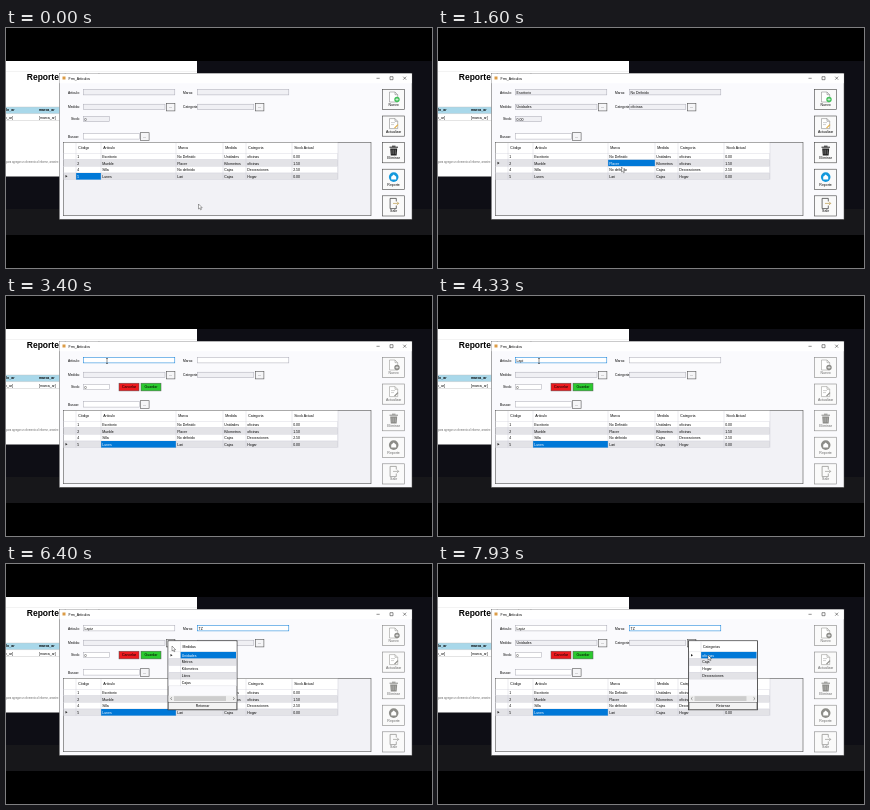
Recreate the animation shown at these times as an HTML page. Size 426 px wide and 240 px high, loop 8 s.

```html
<!DOCTYPE html>
<html lang="es">
<head>
<meta charset="utf-8">
<title>Artículos</title>
<style>
  html, body { margin: 0; width: 100%; height: 100%; overflow: hidden; background: #000; }
  svg { display: block; width: 100vw; height: 100vh; }
  text { font: 3.5px "Liberation Sans", Arial, sans-serif; fill: #000; white-space: pre; }
</style>
</head>
<body>
<svg viewBox="0 0 426 240" preserveAspectRatio="none">
  <g id="base"></g>
  <g id="live"></g>
  <g id="pointer"></g>
</svg>
<script>
const LOOP = 8000, STEP = 200 / 3;
const BLUE = '#0078d7', LINE = '#c9c9d3', READONLY = '#f0f0f4';
const byId = id => document.getElementById(id);

const box = (x, y, w, h, fill, stroke = 'none', sw = .6) =>
  `<rect x="${x}" y="${y}" width="${w}" height="${h}" fill="${fill}" stroke="${stroke}" stroke-width="${sw}"/>`;
const label = (x, y, s, style = '') => `<text x="${x}" y="${y}" style="${style}">${s}</text>`;
const path = (d, stroke, sw = .6, fill = 'none') =>
  `<path d="${d}" fill="${fill}" stroke="${stroke}" stroke-width="${sw}"/>`;
const centred = 'text-anchor:middle';

const columns = [70, 95, 170, 217, 240, 286, 332];
const headings = ['Código', 'Articulo', 'Marca', 'Medida', 'Categoria', 'Stock Actual'];
const rows = [
  ['1', 'Escritorio', 'No Definido', 'Unidades', 'oficinas', '0.00'],
  ['2', 'Mueble', 'Placer', 'Kilometros', 'oficinas', '1.50'],
  ['4', 'Silla', 'No definido', 'Cajas', 'Decoraciones', '2.50'],
  ['5', 'Lunes', 'Lari', 'Cajas', 'Hogar', '0.00']
];
const rowTop = i => 125.2 + i * 6.6;

function background() {
  return box(0, 33, 426, 174, '#0e0e15') + box(0, 181, 426, 26, '#17171a') +
    box(0, 33, 191, 115.5, '#fff') +
    path('M0 43.5H191', '#e6e6e6', .5) +
    label(20.8, 52.2, 'Reporte de Articulos', 'font-size:8.5px;font-weight:700') +
    box(0, 79, 60, 6.6, '#a9d8ea') + path('M0 79H60M0 85.6H60M0 92.5H60', '#bbb', .4) +
    label(-2, 83.3, 'ulo_ar', 'font-weight:700') + label(33, 83.3, 'marca_ar', 'font-weight:700') +
    label(-1, 90.5, 'o_ar]') + label(33, 90.5, '[marca_ar]') +
    label(0, 135.3, 'para agregar un elemento al informe, arrastre', 'font-size:2.6px;fill:#666');
}

function windowFrame() {
  const labels = [[62, 65.8, 'Articulo:'], [177, 65.8, 'Marca:'], [62, 80, 'Medida:'],
    [177, 80, 'Categoria:'], [65, 92.2, 'Stock:'], [62, 109.5, 'Buscar:']];
  return box(53.3, 45.3, 352.7, 146, '#fafafd', '#555', .5) +
    box(53.6, 45.6, 352.1, 9.6, '#fff') + box(56.5, 48.5, 3, 3, '#dc9b45') +
    label(62.5, 51.8, 'Frm_Articulos') +
    path('M370.5 50.3h3.2M384 48.7h3v3h-3zM397.2 48.7l3 3m0-3l-3 3', '#222', .5) +
    labels.map(l => label(...l, 'font-size:3.3px')).join('');
}

const field = (x, y, w, value, fill, focus) =>
  box(x, y, w, 5.4, fill, focus ? BLUE : '#a9a9b4', .5) + label(x + 1.3, y + 4.2, value);
const picker = (x, y) => box(x, y, 8.6, 7.6, '#f5f5f7', '#555', .6) + label(x + 4.3, y + 4.8, '...', centred);

function grid(selRow, selCol) {
  let out = box(57.3, 114.3, 307.7, 73.4, '#f2f2f6', '#555', .6) + box(57.8, 114.8, 274, 10.3, '#fff');
  headings.forEach((h, i) => out += label(columns[i] + 2.2, 121.3, h));
  rows.forEach((row, r) => {
    const y = rowTop(r);
    out += box(57.8, y, 274, 6.6, r % 2 ? '#e3e3e7' : '#fff', LINE, .3);
    if (r === selRow) {
      out += path(`M59.5 ${y + 2}l2 1.3l-2 1.3z`, 'none', 0, '#222') +
        box(columns[selCol], y, columns[selCol + 1] - columns[selCol], 6.6, BLUE);
    }
    row.forEach((s, c) => out += label(columns[c] + 1.2, y + 4.7, s,
      r === selRow && c === selCol ? 'fill:#fff' : ''));
  });
  return out + path(columns.map(x => `M${x} 115V151.6`).join(''), LINE, .35);
}

function sideButtons(disabled) {
  const tint = c => disabled ? '#8c8c88' : c;
  const page = path('M383.5 64h5.5l2.7 2.7V74h-8.2zM389 64v2.7h2.7', tint('#777'), .5, '#fff');
  const icons = [
    page + `<circle cx="391" cy="71.5" r="2.7" fill="${tint('#43c05a')}"/>` + path('M389.5 71.5h3m-1.5-1.5v3', '#fff', .6),
    page + path('M385 68h4m-4 2h3', tint('#888'), .4) + path('M388.5 73.5l3.5-3.5', tint('#e3b04a'), 1.3),
    path('M383.5 66h8.5M386 65h3.5', tint('#222'), 1) + path('M384.2 67.2h7l-.6 7h-5.8z', 'none', 0, tint('#222')) +
      path('M386 68.5v4.5m1.7-4.5v4.5m1.7-4.5v4.5', '#ddd', .35),
    `<circle cx="387.7" cy="69.3" r="4.8" fill="${tint('#1298dc')}"/>` +
      path('M385.2 69l2.5-2.2 2.5 2.2v2.8h-5z', 'none', 0, '#fff'),
    path('M390.3 67v-3h-6.2v10.2h6.2v-3', tint('#333'), .7) + path('M387 69h5.7m-1.7-1.7l1.7 1.7l-1.7 1.7', tint('#b38b32'), .6)
  ];
  return ['Nuevo', 'Actualizar', 'Eliminar', 'Reporte', 'Salir'].map((name, i) =>
    `<g transform="translate(0 ${i * 26.6})">` + box(376.4, 61.4, 22.2, 20.2, '#fafafa', disabled ? '#888' : '#444', .6) +
    icons[i] + label(387.6, 78, name, centred + (disabled ? ';fill:#666' : '')) + '</g>').join('');
}

function popup(x, y, title, items) {
  let out = box(x, y, 69, 69, '#fafafd', '#333', .8) + box(x + .6, y + .6, 67.8, 10.5, '#fff') +
    label(x + 14.5, y + 7.3, title);
  items.forEach((s, i) => {
    const top = y + 11.1 + i * 6.8;
    out += box(x + .6, top, 67.8, 6.8, i % 2 ? '#e3e3e7' : '#fff', LINE, .3);
    if (!i) out += box(x + 12.5, top, 55.5, 6.8, BLUE) + path(`M${x + 2.5} ${top + 2}l2 1.3l-2 1.3z`, 'none', 0, '#222');
    out += label(x + 13.7, top + 4.6, s, i ? '' : 'fill:#fff');
  });
  return out + path(`M${x + 12.5} ${y + 1}V${y + 11.1 + items.length * 6.8}`, LINE, .35) +
    box(x + .6, y + 54.8, 67.8, 6, '#eee') + box(x + 6, y + 55.4, 52, 4.8, '#cdcdcd') +
    path(`M${x + 4} ${y + 56.5}l-1.5 1.3l1.5 1.3M${x + 65} ${y + 56.5}l1.5 1.3l-1.5 1.3`, '#444', .5) +
    box(x + .6, y + 61.5, 67.8, 7, '#f3f3f3', '#555', .5) + label(x + 34.5, y + 66.1, 'Retornar', centred);
}

const typed = (s, t, start, step) => s.slice(0, Math.max(0, Math.floor((t - start) / step) + 1));

function stateAt(t) {
  const s = { values: ['', '', '', '', '0'], row: 3, col: 0, focus: -1, adding: t >= 2800, menu: 0 };
  if (t >= 930) [s.row, s.col] = [0, 1];
  if (t >= 1400) [s.row, s.col] = [1, 2];
  if (t >= 2000) [s.row, s.col] = [3, 1];
  if (t >= 1070) s.values = rows[0].slice(1);
  if (t >= 2130) s.values = rows[3].slice(1);
  if (s.adding) {
    s.values = [typed('Lapiz', t, 3730, 200), typed('TZ', t, 5470, 270), t >= 7000 ? 'Unidades' : '', '', '0'];
    s.focus = t < 5130 ? 0 : 1;
    s.menu = t >= 6130 && t < 7000 ? 1 : t >= 7470 ? 2 : 0;
  }
  return s;
}

function scene({ values: v, row, col, focus, adding, menu }) {
  const editable = adding ? '#fff' : READONLY;
  let out = field(77.3, 61.5, 91.5, v[0], editable, focus === 0) +
    field(191.3, 61.5, 91.5, v[1], editable, focus === 1) +
    field(77.3, 76.2, 81.7, v[2], READONLY) + picker(160.3, 75.3) +
    field(191.3, 76.2, 56.5, v[3], READONLY) + picker(249.3, 75.3) +
    field(77.3, 88.3, 26, v[4], editable) + field(77.3, 105.7, 56, '', '#fff') + picker(134.5, 104.7);
  if (adding) {
    out += box(113, 87.2, 20, 7.7, '#ec1a1e', '#555', .5) + label(123, 92.3, 'Cancelar', centred) +
      box(135, 87.2, 20, 7.7, '#2bca2f', '#555', .5) + label(145, 92.3, 'Guardar', centred);
  }
  out += grid(row, col) + sideButtons(adding);
  if (menu === 1) out += popup(162, 76.8, 'Medidas', ['Unidades', 'Metros', 'Kilometros', 'Litros', 'Cajas']);
  if (menu === 2) out += popup(250.5, 76.8, 'Categorias', ['oficinas', 'Caja', 'Hogar', 'Decoraciones']);
  return out;
}

// Pointer stops: time, x, y
const stops = [[0, 192.5, 176], [400, 192.5, 176], [870, 118, 128], [1130, 118, 128], [1400, 181, 136],
  [1600, 183.5, 139], [1730, 183.5, 139], [1930, 135, 148], [2130, 135, 148], [2330, 190, 151], [2440, 194, 149],
  [2730, 386, 70], [2900, 386, 70], [3330, 101, 65], [4730, 101, 65], [5070, 211, 65], [5870, 211, 65],
  [6070, 165, 78], [6200, 165, 78], [6400, 166, 82], [6870, 181, 90], [7070, 181, 90], [7400, 254, 78],
  [7530, 254, 78], [7900, 270, 91], [8000, 270, 91]];

function pointerAt(t) {
  const i = Math.max(1, stops.findIndex(s => s[0] > t));
  const [a, b] = [stops[i - 1], stops[i]];
  const p = (t - a[0]) / (b[0] - a[0]), k = p * p * (3 - 2 * p);
  return [a[1] + (b[1] - a[1]) * k, a[2] + (b[2] - a[2]) * k];
}

function pointer([x, y]) {
  const overText = y > 61 && y < 67.2 && ((x > 77 && x < 169) || (x > 191 && x < 283));
  return `<g transform="translate(${x.toFixed(2)} ${y.toFixed(2)})">` + (overText
    ? path('M-1 -2.5h2M0 -2.5v5M-1 2.5h2', '#222', .5)
    : path('M0 0v5l1.2-1 .8 1.8 .9-.4-.8-1.7h1.6z', '#222', .4, '#fff')) + '</g>';
}

byId('base').innerHTML = background() + windowFrame();
let shown = '';
function draw(now) {
  const t = Math.floor((now % LOOP + 4) / STEP) * STEP % LOOP;
  const state = stateAt(t), key = JSON.stringify(state);
  if (key !== shown) {
    byId('live').innerHTML = scene(state);
    shown = key;
  }
  byId('pointer').innerHTML = pointer(pointerAt(t));
  requestAnimationFrame(draw);
}
draw(performance.now());
</script>
</body>
</html>
```
